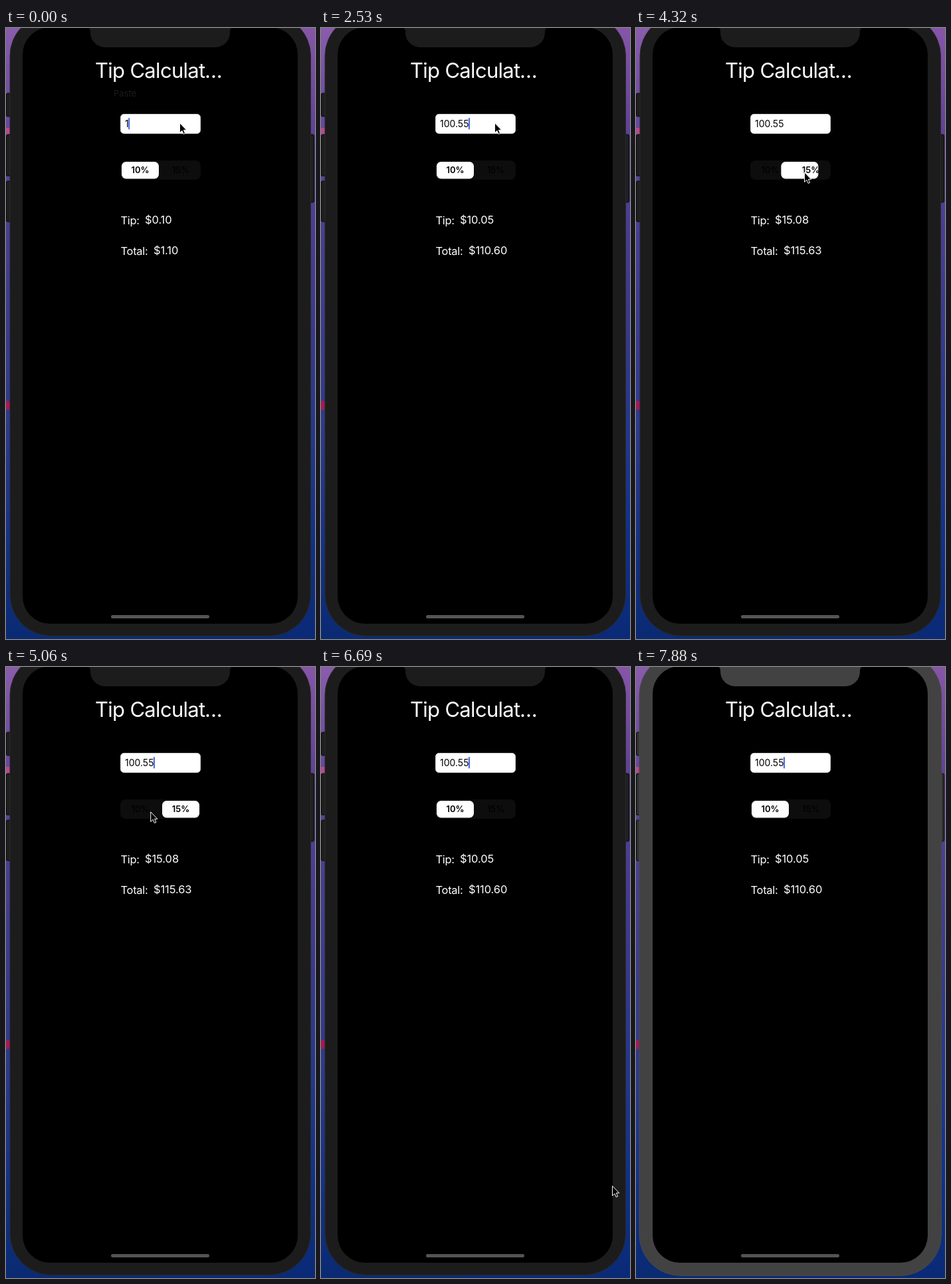
These frames come from a looping animation (465x918 px, 7980 ms). An HTML page with a canvas:

```html
<!DOCTYPE html>
<html lang="en">
<head>
<meta charset="utf-8">
<title>Tip Calculator</title>
<style>
  html, body { margin: 0; width: 100%; height: 100%; overflow: hidden; background: #000; }
  canvas, svg { position: absolute; left: 0; top: 0; width: 465px; height: 918px; }
  text { font-family: Inter, Roboto, sans-serif; fill: #fff; white-space: pre; }
  .title { font-size: 31px; letter-spacing: -0.7px; }
  .label { font-size: 16.5px; letter-spacing: -0.3px; }
  .value { font-size: 16.5px; letter-spacing: -0.1px; }
  .field { font-size: 14px; fill: #000; }
  .paste { font-size: 13px; fill: #1b1b1b; }
  .seg { font-size: 13px; fill: #000; text-anchor: middle; }
</style>
</head>
<body>
<canvas id="stage" width="465" height="918"></canvas>
<svg viewBox="0 0 465 918">
  <text class="title" x="134" y="75">Tip Calculat</text>
  <text class="title" x="299" y="75" style="letter-spacing:0">...</text>
  <text class="paste" id="paste" x="162" y="103">Paste</text>
  <text class="field" id="amount" x="179" y="148.5"></text>
  <text class="seg" id="low" x="202" y="218">10%</text>
  <text class="seg" id="high" x="263" y="218">15%</text>
  <text class="label" x="172.5" y="295">Tip:</text>
  <text class="value" id="tip" x="209" y="294"></text>
  <text class="label" x="172.5" y="341">Total:</text>
  <text class="value" id="total" x="222" y="340"></text>
  <path id="cursor" d="M.5 .8V15.4L3.9 12.3 6.2 17.4 8.6 16.4 6.4 11.3H10.7Z" fill="#000" stroke="#fff"/>
</svg>
<script>
const LOOP = 7980, STEP = 148.33, MOVE_START = 3130;
const $ = id => document.getElementById(id);
const ctx = $('stage').getContext('2d');

const typing = [[0, '1'], [450, '10'], [900, '100'], [1340, '100.'], [1940, '100.5'], [2530, '100.55']];
const pointer = [
  [0, 261, 142], [3280, 261, 142], [3580, 257, 205], [3730, 255, 222], [3876, 253, 216],
  [4760, 253, 216], [5060, 217, 217], [5950, 217, 217], [6250, 265, 380],
  [6541, 389, 712], [6690, 438, 779], [6840, 438, 850], [6990, 437, 920]
];

const snap = t => t < MOVE_START ? t : MOVE_START + Math.floor((t - MOVE_START + 1) / STEP) * STEP;

function smooth(t, start, length) {
  const x = Math.min(1, Math.max(0, (t - start) / length));
  return x * x * (3 - 2 * x);
}

function pointerAt(t) {
  const next = pointer.findIndex(k => k[0] > t);
  if (next < 0) return pointer[pointer.length - 1].slice(1);
  const [t0, x0, y0] = pointer[next - 1], [t1, x1, y1] = pointer[next];
  const p = (t - t0) / (t1 - t0);
  return [x0 + (x1 - x0) * p, y0 + (y1 - y0) * p];
}

const money = v => '$' + (Math.floor(v * 100 + 1e-6) / 100).toFixed(2);

function box(x, y, w, h, r, fill, stroke) {
  ctx.beginPath();
  ctx.roundRect(x, y, w, h, r);
  ctx.fillStyle = fill;
  ctx.fill();
  if (stroke) {
    ctx.strokeStyle = stroke;
    ctx.lineWidth = 1;
    ctx.stroke();
  }
}

function gradient(...colors) {
  const g = ctx.createLinearGradient(0, 0, 0, 918);
  colors.forEach((c, i) => g.addColorStop(i / (colors.length - 1), c));
  return g;
}

const leftSky = gradient('#8a5cac', '#65489c', '#473f92', '#3a3c8e', '#2b3a8e', '#15328a', '#0a2a72');
const rightSky = gradient('#8655a8', '#604296', '#493c92', '#37398c', '#22388c', '#10318a', '#0a2a76');

function drawWallpaper() {
  box(0, 0, 232, 918, 0, leftSky);
  box(232, 0, 233, 918, 0, rightSky);
  box(0, 150, 8, 11, [0, 4, 0, 0], '#b84a8c');
  box(0, 161, 8, 62, 0, '#4c2440');
  box(0, 560, 8, 14, [0, 6, 6, 0], '#a01c55');
}

function drawPhone(light) {
  const body = light ? '#424242' : '#1c1c1c', grow = light ? 1 : 0;
  const button = light ? '#303030' : '#1f1f1f';
  for (const [y, h] of [[98, 35], [160, 62], [230, 61]]) box(0.5, y, 9, h, 2, button, '#080808');
  box(454, 160, 9.5, 102, 2, button, '#080808');
  box(6 - grow, -20, 452.5 + 2 * grow, 933.5 + grow, 62, body, light ? '#4a4a4a' : '#2a2a2a');
  box(25, -1, 414, 896, 41, '#000');

  ctx.beginPath();
  ctx.moveTo(121, -1);
  ctx.quadraticCurveTo(127, -1, 127, 5);
  ctx.arcTo(127, 29, 150, 29, 22);
  ctx.arcTo(337, 29, 337, 5, 22);
  ctx.lineTo(337, 5);
  ctx.quadraticCurveTo(337, -1, 343, -1);
  ctx.fillStyle = body;
  ctx.fill();
  box(158, 882, 148, 5, 2.5, '#545454');
}

function drawControls(pillX, caretX) {
  box(172.5, 129.5, 120, 29, 5, '#fff', '#cfcfcf');
  if (caretX) box(caretX, 135, 2, 17.5, 1, '#4468dc');
  box(172, 199, 121, 29, 8, '#0d0d0d');
  box(pillX, 201, 56, 25.5, 6.5, '#fff');
}

function render(now) {
  const t = now % LOOP, s = snap(t);
  const amount = typing.filter(k => k[0] <= t).pop()[1];
  const slide = smooth(s, 4100, 330) - smooth(s, 5459, 330);
  const high = s >= 4160 && s < 5495;
  const bill = parseFloat(amount), tip = bill * (high ? 0.15 : 0.1);

  $('paste').style.display = t < 150 ? '' : 'none';
  $('amount').textContent = amount;
  $('tip').textContent = money(tip);
  $('total').textContent = money(bill + tip);
  $('low').style.fontWeight = high ? 500 : 600;
  $('high').style.fontWeight = high ? 600 : 500;

  const [x, y] = pointerAt(s);
  $('cursor').setAttribute('transform', `translate(${x} ${y})`);

  const caretOn = t < MOVE_START || (s - MOVE_START) % 1030 >= 320;
  ctx.font = '14px Inter, Roboto, sans-serif';
  const caretX = caretOn ? 179 + ctx.measureText(amount).width - 0.5 : 0;

  drawWallpaper();
  drawPhone(t >= 7880);
  drawControls(174 + 61 * slide, caretX);
  requestAnimationFrame(tick);
}

let begin;
function tick(now) {
  begin ??= now;
  render(now - begin);
}
requestAnimationFrame(tick);
</script>
</body>
</html>
```
